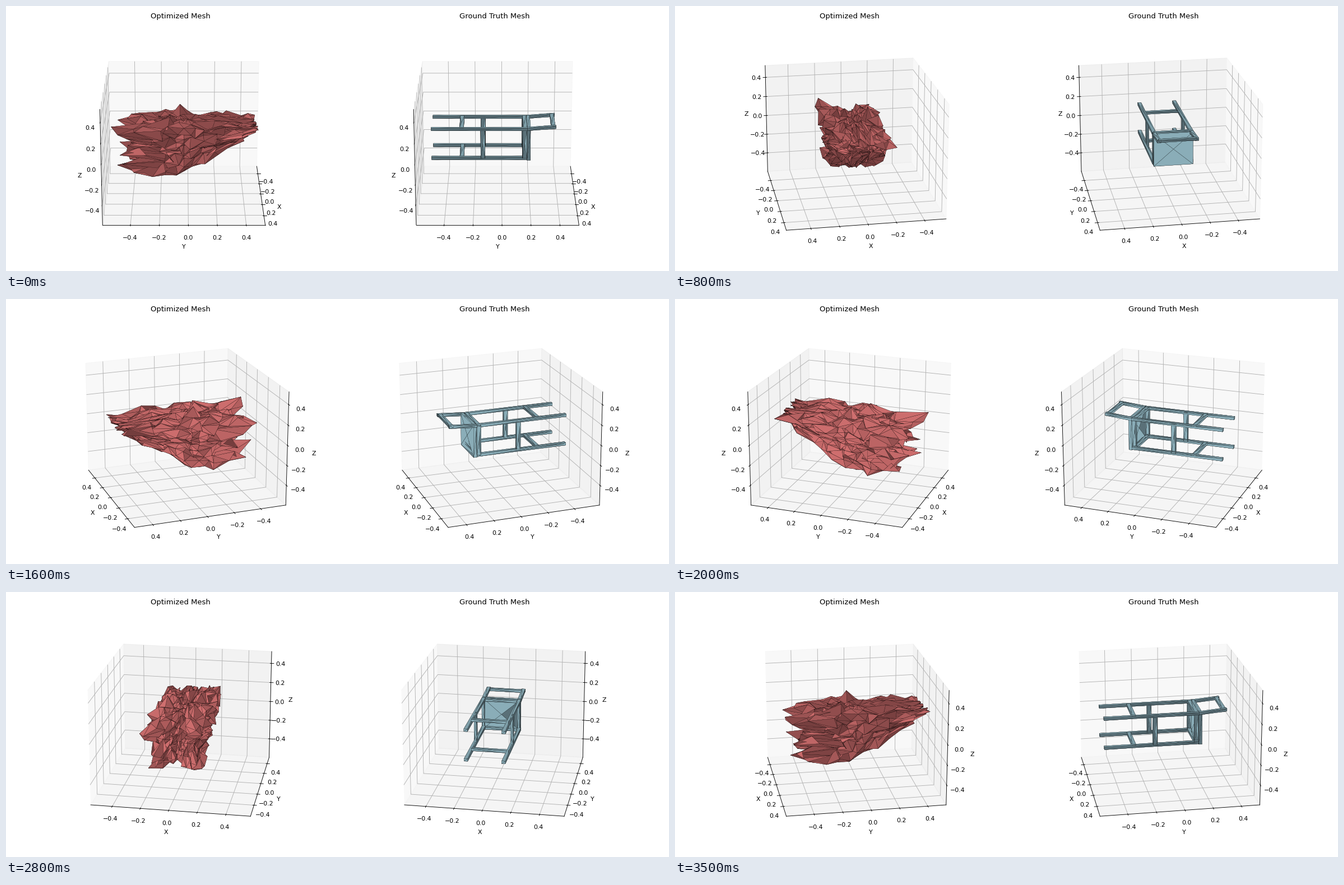
Recreate the animation shown at these times as a matplotlib script. Size 1183x473 px, loop 3.6 s.

```python
from itertools import combinations

import numpy as np
import matplotlib.pyplot as plt
from matplotlib.animation import FuncAnimation
from matplotlib.colors import to_rgb
from mpl_toolkits.mplot3d.art3d import Poly3DCollection

WIDTH, HEIGHT, DPI = 1183, 473, 78.87
FRAMES, INTERVAL = 36, 100
CENTER = np.array([0.008, -0.0306, -0.039])
SPAN = 1.124
BOX_SCALE = np.array([1.0589, 1.0589, 0.7942])
LIGHT = np.array([-2, -2, 1]) / 3
SIDE, BOTTOM = 432.8, 11.8


def outward(tri, inside):
    """Order the corners so that the normal points away from a point."""
    a, b, c = tri
    facing = np.dot(np.cross(b - a, c - a), (a + b + c) / 3 - inside)
    return [a, b, c] if facing > 0 else [a, c, b]


def beam(p, q, axis, half):
    """Bar from p to q; half gives its half sizes on the two other axes."""
    p, q = np.array(p, float), np.array(q, float)
    others = [k for k in range(3) if k != axis]
    ring = []
    for su, sv in ((-1, -1), (1, -1), (1, 1), (-1, 1)):
        offset = np.zeros(3)
        offset[others] = su * half[0], sv * half[1]
        ring.append(offset)
    start = [p + o for o in ring]
    end = [q + o for o in ring]
    quads = [start, end]
    for k in range(4):
        m = (k + 1) % 4
        quads.append([start[k], start[m], end[m], end[k]])
    middle = (p + q) / 2
    tris = []
    for a, b, c, d in quads:
        tris += [outward((a, b, c), middle), outward((a, c, d), middle)]
    return tris


def seat_panel():
    x, y0, y1, z0, z1 = 0.14, 0.179, 0.203, -0.181, 0.141
    corners = [(-x, z0), (x, z0), (x, z1), (-x, z1)]
    inside = np.array([0, 1, 0.0])
    tris = []
    for y in (y0, y1):
        hub = np.array([0, y, (z0 + z1) / 2])
        for k in range(4):
            (xa, za), (xb, zb) = corners[k], corners[(k + 1) % 4]
            a, b, c = outward((hub, np.array([xa, y, za]),
                               np.array([xb, y, zb])), inside)
            dark = y == y0 and k == 1
            tris.append([a, c, b] if dark else [a, b, c])
    middle = np.array([0, (y0 + y1) / 2, (z0 + z1) / 2])
    for k in range(4):
        (xa, za), (xb, zb) = corners[k], corners[(k + 1) % 4]
        a, b = np.array([xa, y0, za]), np.array([xb, y0, zb])
        c, d = np.array([xb, y1, zb]), np.array([xa, y1, za])
        tris += [outward((a, b, c), middle), outward((a, c, d), middle)]
    return tris


def chair():
    x, high, low, r = 0.132, 0.131, -0.161, 0.0125
    tris = seat_panel()
    for s in (-x, x):
        tris += beam((s, -0.5, high), (s, 0.18, high), 1, (r, r))
        tris += beam((s, 0.18, high), (s, 0.382, high + 0.021), 1, (r, r))
        tris += beam((s, -0.5, low), (s, 0.179, low), 1, (r, r))
        for y in (-0.1355, 0.163):
            tris += beam((s, y, low), (s, y, high), 2, (0.009, 0.015))
    for y, z in ((-0.286, high), (-0.286, low), (0.163, high),
                 (0.163, low), (0.363, high + 0.019)):
        tris += beam((-x, y, z), (x, y, z), 0, (0.014, 0.011))
    return np.array(tris)


def icosphere(levels):
    g = (1 + 5 ** 0.5) / 2
    verts = []
    for a in (-1, 1):
        for b in (-g, g):
            verts += [(0, a, b), (a, b, 0), (b, 0, a)]
    verts = [np.array(v) / np.hypot(1, g) for v in verts]
    edge = 2 / np.hypot(1, g)
    faces = []
    for i, j, k in combinations(range(12), 3):
        sides = [np.linalg.norm(verts[m] - verts[n])
                 for m, n in ((i, j), (j, k), (k, i))]
        if np.allclose(sides, edge):
            up = np.linalg.det([verts[i], verts[j], verts[k]]) > 0
            faces.append((i, j, k) if up else (i, k, j))
    for _ in range(levels):
        middles, finer = {}, []

        def middle(m, n):
            key = (min(m, n), max(m, n))
            if key not in middles:
                v = verts[m] + verts[n]
                verts.append(v / np.linalg.norm(v))
                middles[key] = len(verts) - 1
            return middles[key]

        for i, j, k in faces:
            a, b, c = middle(i, j), middle(j, k), middle(k, i)
            finer += [(i, a, c), (j, b, a), (k, c, b), (a, b, c)]
        faces = finer
    return np.array(verts), np.array(faces)


def spiky_mesh():
    """Sphere pulled into a jagged wedge with four stubby legs."""
    rng = np.random.RandomState(4)
    dirs, faces = icosphere(3)
    n = len(dirs)
    px, py, pz = (dirs / np.abs(dirs).max(axis=1, keepdims=True)).T
    corner = np.abs(px * pz)
    leg = 0.28 + 0.15 * np.abs(px) + 0.17 * corner
    y = py * np.where(py < 0, leg, 0.52)
    y *= 1.07 - 0.85 * (1 - 0.6 * corner) * rng.rand(n) ** 1.4
    x = px * np.where(pz > 0, 0.205, 0.18) * rng.uniform(0.6, 1.22, n)
    top = 0.16 - 0.02 * np.clip(y, 0, 1)
    base = np.interp(y, [-0.57, -0.42, -0.08, 0.5], [-0.17, -0.22, -0.245, 0.08])
    base = np.where(y < -0.15, base * (0.75 + 0.25 * np.abs(px)), base)
    z = (top + base) / 2 + (top - base) / 2 * pz + rng.normal(0, 0.019, n)
    points = np.column_stack([x, y, z])
    spike = np.array([-0.12, -0.03, 0.247])
    points[np.argmin(np.linalg.norm(points - spike, axis=1))] = spike
    return (points / BOX_SCALE + CENTER)[faces]


def shaded(tris, color):
    normals = np.cross(tris[:, 1] - tris[:, 0], tris[:, 2] - tris[:, 0])
    normals /= np.linalg.norm(normals, axis=1, keepdims=True)
    level = 0.45 + 0.21 * (1 + normals @ LIGHT)
    return level[:, None] * np.array(to_rgb(color))


def make_axes(middle, title, tris, color):
    rect = [(middle - SIDE / 2) / WIDTH, BOTTOM / HEIGHT,
            SIDE / WIDTH, SIDE / HEIGHT]
    ax = fig.add_axes(rect, projection="3d")
    ax.add_collection3d(Poly3DCollection(
        tris, facecolors=shaded(tris, color), edgecolors="black",
        linewidths=0.2))
    limits = [(c - SPAN / 2, c + SPAN / 2) for c in CENTER]
    ax.set_xlim(limits[0])
    ax.set_ylim(limits[1])
    ax.set_zlim(limits[2])
    for set_ticks in (ax.set_xticks, ax.set_yticks, ax.set_zticks):
        set_ticks([-0.4, -0.2, 0.0, 0.2, 0.4])
    ax.set_xlabel("X")
    ax.set_ylabel("Y")
    ax.set_zlabel("Z")
    # 3D axes scale the title height by 0.92
    ax.set_title(title, y=1 / 0.92)
    return ax


fig = plt.figure(figsize=((WIDTH + 1e-6) / DPI, (HEIGHT + 1e-6) / DPI), dpi=DPI)
panels = [
    make_axes(311.6, "Optimized Mesh", spiky_mesh(), "lightcoral"),
    make_axes(871.3, "Ground Truth Mesh", chair(), "lightblue"),
]


def update(i):
    for ax in panels:
        ax.view_init(elev=20, azim=i * 360 / FRAMES)
    return panels


anim = FuncAnimation(fig, update, frames=FRAMES, interval=INTERVAL,
                     repeat=True, repeat_delay=0, blit=False)
plt.show()
```
